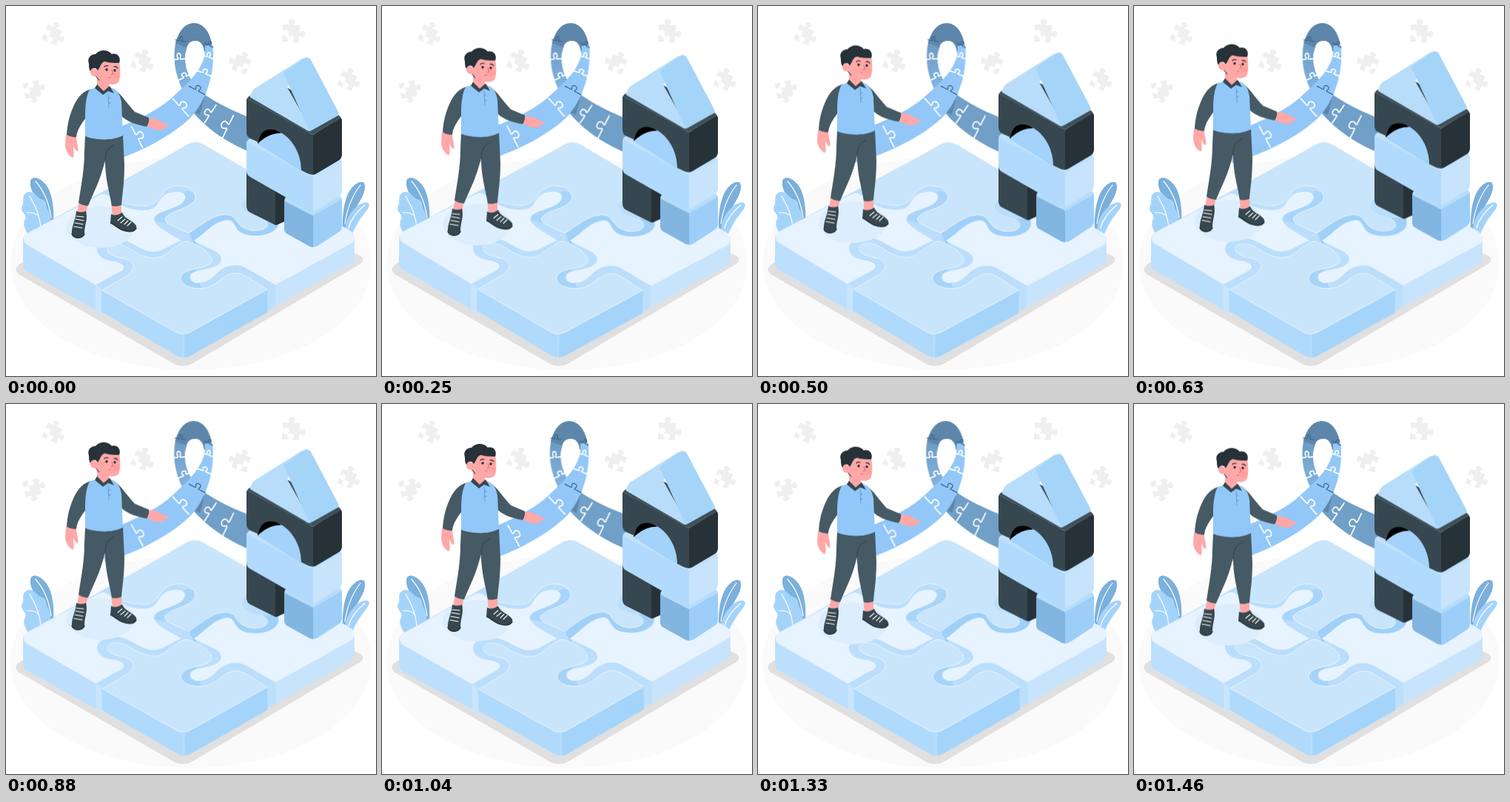
These frames come from a looping animation (500 px wide and 500 px high, 1.5 s). An HTML page:

```html
<!DOCTYPE html>
<html lang="en">
<head>
<meta charset="utf-8">
<title>Puzzle floor</title>
<style>
html, body { margin: 0; width: 100%; height: 100%; overflow: hidden; background: #fff; }
svg { display: block; width: 100vw; height: 100vh; }
.float { animation: float 1.5s linear infinite; }
.wind { animation: wind 1.5s linear infinite; }
#ribbon { transform-origin: 253px 116px; }
#floor { transform-origin: 247px 329px; }
@keyframes float { 50% { transform: translateY(-10px); } }
@keyframes wind {
  0%, 100% { transform: rotate(0deg); }
  25% { transform: rotate(1deg); }
  75% { transform: rotate(-1deg); }
}
.line { fill: none; stroke-linecap: round; stroke-linejoin: round; }
.rim { stroke: #e9f4fe; stroke-width: 1; }
</style>
</head>
<body>
<svg viewBox="0 0 500 500">
<defs>
  <path id="piece" d="M-12-12H-4C-2-12-3-14-4-15C-6-18-4-20 0-20S6-18 4-15C3-14 2-12 4-12H12V-4C12-2 14-3 15-4C18-6 20-4 20 0S18 6 15 4C14 3 12 2 12 4V12H4C2 12 3 10 4 9C6 5 4 3 0 3S-6 5-4 9C-3 10-2 12-4 12H-12V4C-12 2-10 3-9 4C-5 6-3 4-3 0S-5-6-9-4C-10-3-12-2-12-4Z"/>
  <path id="seam" class="line" vector-effect="non-scaling-stroke" d="M-16 0H-4C-2 0-3-2-4-3C-6-7-3-9 0-9S6-7 4-3C3-2 2 0 4 0H16"/>
  <linearGradient id="loop" gradientUnits="userSpaceOnUse" x1="0" y1="40" x2="0" y2="110">
    <stop stop-color="#6796bf"/><stop offset="1" stop-color="#82b4df"/>
  </linearGradient>
</defs>

<g fill="#efefef">
  <use href="#piece" transform="translate(62 39) rotate(24) scale(.88)"/>
  <use href="#piece" transform="translate(182 76) rotate(24) scale(.9)"/>
  <use href="#piece" transform="translate(318 79) rotate(-70) scale(.88)"/>
  <use href="#piece" transform="translate(385 37) rotate(4) scale(.96)"/>
  <use href="#piece" transform="translate(461 101) rotate(20) scale(.88)"/>
  <use href="#piece" transform="translate(35 113) rotate(78) scale(.9)"/>
</g>
<ellipse cx="250" cy="348" rx="244" ry="144" fill="#fafafa"/>
<path fill="#e0e0e0" d="M18 349L230 230L478 337Q487 343 478 349L252 483Q238 490 226 483L18 363Q9 356 18 349Z"/>

<g id="leaves">
  <path fill="#7bb0dc" d="M34 234C40 228 52 236 58 248C64 262 65 278 64 294L53 294C51 277 46 268 40 258C34 250 31 240 34 234Z"/>
  <path fill="#a4d3fa" d="M24 256C27 251 32 250 35 252C40 253 42 259 48 261C56 263 53 270 57 276C61 284 61 294 60 306L32 312C25 302 22 294 26 288C29 282 20 279 21 272C25 266 22 262 24 256Z"/>
  <path fill="#7bb0dc" d="M484 239C478 235 468 242 462 254C457 265 454 282 455 306L463 300C466 282 474 272 478 264C483 256 487 246 484 239Z"/>
  <path fill="#a4d3fa" d="M490 267C485 263 476 268 469 276C462 284 459 292 458 302L468 308C472 298 477 290 483 282C488 276 492 271 490 267Z"/>
  <path class="line" stroke="#fff" stroke-width="1.2" d="M40 237C50 248 58 266 61 286M32 257C40 270 46 284 47 300M28 279C36 279 41 280 44 284M479 242C468 256 461 274 458 294M485 269C474 278 466 288 463 300"/>
</g>

<g id="ribbon" class="wind">
  <path fill="#709fc7" d="M256 110C278 128 302 142 375 168V213C308 194 274 170 247 137Z"/>
  <path fill="#5d86aa" d="M270 117L262 147L252 142Z"/>
  <path fill="url(#loop)" d="M230 46C222 80 234 112 254 138L270 121C256 110 241 94 242 66L246 50Z"/>
  <path fill="#5d86aa" d="M229 50C234 32 243 23 254 23C268 23 277 38 279 56L268 62C267 53 263 47 256 47C250 47 246 50 244 56Z"/>
  <path fill="#92c7f8" d="M269 54L279 52C280 57 280 62 280 68C280 94 271 126 252 148C232 170 185 198 133 213L126 174C170 158 203 143 224 124C248 103 269 82 269 60Z"/>
  <g stroke="#fff" stroke-width="1.7">
    <use href="#seam" transform="translate(177 177) rotate(62)"/>
    <use href="#seam" transform="translate(236 137) rotate(48)"/>
    <use href="#seam" transform="translate(276 146) rotate(-57) scale(.9)"/>
    <use href="#seam" transform="translate(300 163) rotate(-64) scale(1.05)"/>
    <use href="#seam" transform="translate(234 72) rotate(-4) scale(.5 .9)"/>
    <use href="#seam" transform="translate(242 96) rotate(-26) scale(.65)"/>
    <use href="#seam" transform="translate(273 69) rotate(18) scale(.45 .7)"/>
    <use href="#seam" transform="translate(268 91) rotate(22) scale(.65)"/>
  </g>
  <g stroke="#3d6488" stroke-width="1.2">
    <use href="#seam" transform="translate(236 47) rotate(10) scale(.45 .6)"/>
    <use href="#seam" transform="translate(274 53) rotate(28) scale(.38 .6)"/>
    <use href="#seam" transform="translate(258 114) rotate(28) scale(.75)"/>
  </g>
</g>

<g id="floor" class="wind">
  <path fill="#badefc" d="M24 316Q22 311 29 307L245 188Q256 181 267 188L464 303Q471 307 471 314L364 390L240 462L121 400Z"/>
  <path fill="#9fd0f8" d="M247 305L254 322L300 300L325 318L376 306L366 246L310 258L290 276Z"/>
  <path fill="#a8d5f9" d="M244 250L260 252L258 264L216 294L200 290L204 280Z"/>
  <path fill="#a6d4f9" d="M252 352L230 362L236 384H264L258 358Z"/>
  <path fill="#c9e5fd" d="M121 377V411L132 417V384Z"/>
  <path fill="#bcdffc" d="M353 382V412L364 406V377Z"/>
  <path fill="#bbdffd" d="M23 314V351Q23 355 27 358L121 411V377Z"/>
  <path fill="#c7e4fc" d="M364 377V406L466 348Q471 345 471 341V313Z"/>
  <path fill="#b0dafc" d="M129 384V413L228 471Q234 475 240 475V442Z"/>
  <path fill="#a4d4fa" d="M240 475Q246 475 252 471L353 414V382L240 442Z"/>
  <path fill="#c9e5fb" d="M245 187Q256 181 267 187L372 248L360 284L345 286C362 294 352 306 330 303C308 297 314 284 300 282C280 280 262 298 247 307C230 299 215 295 215 288C218 276 256 274 256 258C254 246 244 243 230 243C207 246 210 268 190 270C178 271 170 268 160 266L141 247Z"/>
  <path fill="#badefc" d="M345 286C330 283 318 276 319 269L325 258L340 262L362 262V286Z"/>
  <path fill="#e7f3fe" d="M24 316Q22 311 29 307L127 255Q133 252 139 257L158 270C172 277 196 279 203 270C210 260 212 252 230 251C244 251 246 260 237 267C226 275 203 278 200 287C200 298 220 306 237 317C222 322 212 333 198 332C180 331 168 314 146 314C130 315 123 322 123 329C124 339 134 344 146 345C160 347 164 355 152 360L121 377L29 323Q24 320 24 316Z"/>
  <path fill="#e7f3fe" d="M254 317C270 307 280 291 300 289C312 290 306 304 325 309C348 314 372 304 368 290L366 246L464 303Q472 308 471 314Q471 318 466 321L364 377L326 355C312 347 300 350 288 358C280 366 272 376 256 374C246 371 246 361 258 358C275 355 290 352 291 342C290 330 270 328 254 317Z"/>
  <path class="rim" fill="#c9e5fb" d="M130 384L164 364C178 354 172 344 158 341C142 339 134 332 138 326C144 318 160 322 172 331C190 342 205 343 216 335C226 328 236 318 245 318C255 322 280 332 278 345C274 356 238 352 236 368C236 380 262 386 278 378C290 372 296 361 312 361C322 361 340 376 353 383L250 440Q240 446 230 441Z"/>
  <path class="line rim" d="M158 266C170 268 178 271 190 270C210 268 207 246 230 243C244 243 254 246 256 258C256 274 218 276 215 288C215 295 230 299 247 307C262 298 280 280 300 282C314 284 308 297 330 303C352 306 362 294 345 286"/>
  <path class="line" stroke="#c9e5fd" d="M240 444V474"/>
</g>

<g id="tower" class="float">
  <path fill="#37474f" d="M325 218L364 240V296L330 279Q325 276 325 271Z"/>
  <path fill="#263238" d="M364 240L379 248V290L370 294Q367 296 364 296Z"/>
  <path fill="#b5dcfb" d="M376 264Q376 258 382 256L415 240L449 255Q454 258 454 263L415 284Z"/>
  <path fill="#82b5e0" d="M376 263L415 283V326Q411 326 407 323L380 308Q376 306 376 301Z"/>
  <path fill="#9ccef8" d="M415 283L454 261V298Q454 303 449 306L423 323Q419 326 415 326Z"/>
  <path class="line" stroke="#b8ddfb" d="M378 264L415 283L453 261"/>
  <path fill="#bfe1fc" d="M325 186Q325 181 330 179L362 162L450 206Q454 208 454 213L415 233Z"/>
  <path fill="#b1dafc" d="M325 184L415 232V278Q411 278 407 275L330 231Q325 228 325 223Z"/>
  <path fill="#c7e4fc" d="M415 232L454 211V250Q454 255 449 258L422 275Q419 278 415 278Z"/>
  <path fill="#a3d2fa" d="M340 186L350 164L385 168L402 198V224L397 222Z"/>
  <path d="M340 185C342 170 352 163 364 166L372 172C359 171 349 178 340 186Z"/>
  <path fill="#3f5059" d="M325 128Q325 124 330 121L368 104L449 147L453 151L415 174Z"/>
  <path fill="#37474f" d="M325 126L415 174V228Q411 228 407 226L399 222C399 202 389 182 373 172C358 163 344 165 341 184L330 179Q325 176 325 171Z"/>
  <path fill="#263238" d="M415 174L450 152Q454 150 454 155V201Q454 206 449 209L422 225Q418 228 415 228Z"/>
  <path class="line" stroke="#52656e" d="M328 126L415 173L451 152" stroke-width=".8"/>
  <path fill="#b7ddfb" d="M331 124Q328 122 331 119Q334 111 340 109L402 70L380 110L413 168Q410 170 407 168Z"/>
  <path fill="#a5d4f9" d="M375 91L402 71Q408 67 412 73L449 143Q451 147 447 149L415 167Q411 170 408 164Z"/>
</g>

<g id="man" class="float">
  <ellipse cx="128" cy="299" rx="46" ry="28" fill="#dcedfd"/>
  <path fill="#ffa8a7" d="M99 264L111 267L108 281L96 279ZM142 266L156 266V283L144 284ZM81 174L95 176C95 184 99 194 97 196C95 197 93 193 91 189C91 196 93 204 90 205C85 203 80 195 80 188Z"/>
  <path fill="#37474f" d="M95 277C99 279 104 279 108 277C111 288 106 296 106 307C105 315 92 316 89 309C88 298 94 290 95 277ZM142 281C147 284 153 282 157 279C160 288 172 290 176 297C178 303 172 307 164 305C155 303 148 296 141 294Z"/>
  <path class="line" stroke="#fff" stroke-width="1.1" d="M95 284L105 285M94 288L105 290M93 293L104 295M92 298L103 300M151 290L157 285M155 293L161 288M160 295L165 290M164 297L169 292"/>
  <path class="line" stroke="#263238" stroke-width="1.4" d="M89 308C92 315 103 315 106 308M142 293C154 302 163 309 176 301"/>
  <path fill="#455a64" d="M107 175C125 182 145 182 158 174L160 215C160 240 157 255 156 269Q149 272 143 270C140 250 134 235 134 208C128 235 119 250 111 270Q104 270 98 266C102 240 106 220 106 196Z"/>
  <path class="line" stroke="#2f3e46" stroke-width=".9" d="M134 210C134 200 136 192 146 188"/>
  <path fill="#455a64" d="M117 112C104 114 97 123 91 136C85 150 83 160 82 174Q88 178 95 177C96 166 104 156 112 146Z"/>
  <path fill="#ffa8a7" d="M191 152C199 151 207 153 212 158L219 160C221 162 217 164 214 164C215 168 207 168 201 167L189 162Z"/>
  <path fill="#455a64" d="M147 113C156 119 165 134 174 143L193 151Q194 157 190 163C173 160 162 155 154 147Z"/>
  <path fill="#91c8f9" d="M113 113L124 109L141 110C149 112 154 118 156 130L158 175C145 182 122 182 107 176V146C107 132 109 120 113 113Z"/>
  <path fill="#ffa8a7" d="M123 93L139 102L139 111L132 116L123 109Z"/>
  <path fill="#37474f" d="M120 111L123 106L132 115L140 108L146 118L138 115L131 120Z"/>
  <path class="line" stroke="#5d92c4" stroke-width=".8" d="M138 118L139 137"/>
  <g fill="#467aa8"><circle cx="140" cy="124" r=".8"/><circle cx="140" cy="131" r=".8"/></g>
  <path fill="#263238" d="M119 92L128 94L126 101L121 95Z"/>
  <path fill="#ffa8a7" d="M122 78C128 70 146 69 153 75C155 85 155 98 152 103C147 108 136 106 130 103C126 100 124 97 122 95C114 97 111 86 117 84Q120 84 122 86Z"/>
  <path fill="#263238" d="M112 78C109 69 116 65 121 65C127 58 138 59 143 65C150 63 156 69 153 77C147 77 140 77 134 75C128 76 128 82 124 87C121 82 116 83 114 88C112 85 112 82 112 78Z"/>
  <circle cx="149" cy="94" r="4" fill="#ff9796" opacity=".6"/>
  <g fill="#263238"><circle cx="136" cy="86" r="1.8"/><circle cx="147" cy="87" r="1.8"/></g>
  <path class="line" stroke="#263238" stroke-width="1.3" d="M133 82Q135 80 138 81M146 82Q149 81 151 84"/>
  <path class="line" stroke="#d96b70" d="M143 87L145 92L142 93M139 97Q141 98 142 96"/>
</g>
</svg>
</body>
</html>
```
